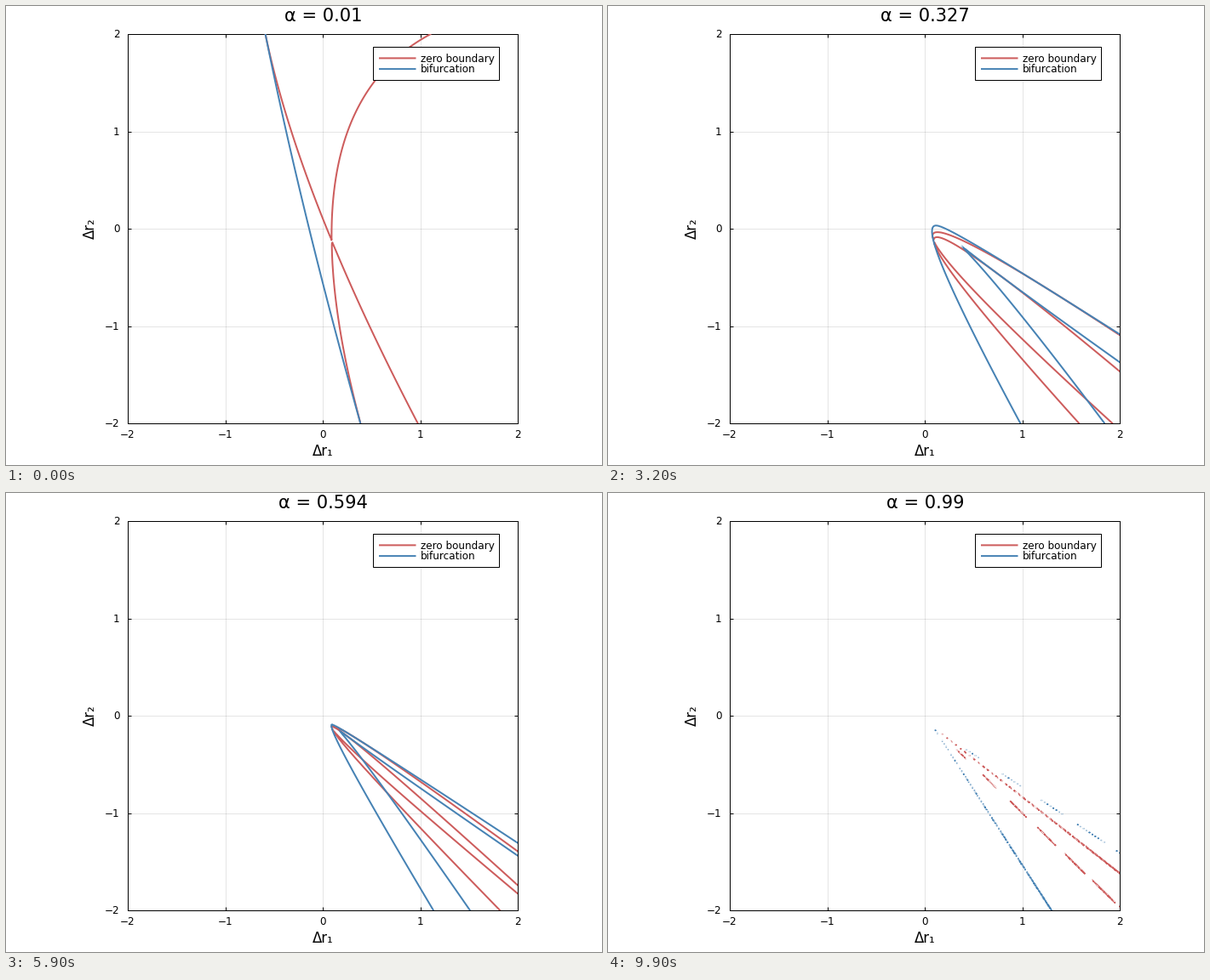
Animation, 700 px wide and 540 px high, one loop 10000 ms. Source, as a matplotlib script:

```python
import numpy as np
import matplotlib.pyplot as plt
from matplotlib.animation import FuncAnimation
from matplotlib.lines import Line2D
from matplotlib.patches import Rectangle

W, H = 700, 540
PT = 0.72                      # points per pixel at 100 dpi
RED, BLUE = "#cd5c5c", "#4682b4"
LEFT, TOP, SIDE = 143, 33, 458
LINE = 2 * PT
FRAMES = 100

# Equilibria: r = ORIGIN + EDGES @ (M v + s v**2), with s = alpha / (1 - alpha)**2
ORIGIN = (0.0915, -0.1211)
E1, E2 = 1.554, 0.6749         # slopes of the limiting cone
M = np.array([[-0.7528, -0.1031],
              [0.5686, -0.0220]])
AXES = np.array([[0.35309, 0.93559],
                 [-0.57515, 0.81805]])   # directions where one abundance is zero

grid = np.linspace(-2, 2, 401)
X, Y = np.meshgrid(grid, grid)
dx, dy = X - ORIGIN[0], Y - ORIGIN[1]
p = -(dy + E2 * dx) / (E1 - E2)
q = (E1 * dx + dy) / (E1 - E2)


def cross(u, v):
    return u[0] * v[1] - u[1] * v[0]


def zero_boundary(s):
    out = 1
    for d in AXES:
        a, b = M @ d, d ** 2
        out = out * (s * cross((p, q), b) ** 2 + cross(a, b) * cross((p, q), a))
    return out


def bifurcation(s):
    (m11, m12), (m21, m22) = M
    u = p + (m11 ** 2 / 4 + m12 * m22 / 2) / s
    v = q + (m22 ** 2 / 4 + m21 * m11 / 2) / s
    k, n = m12 ** 2, m21 ** 2
    return (256 * u ** 2 * v ** 2 - 256 * (k * v ** 3 + n * u ** 3) / s
            + 288 * k * n * u * v / s ** 2 - 27 * (k * n) ** 2 / s ** 4)


plt.rcParams["font.family"] = "DejaVu Sans"
plt.rcParams["path.simplify"] = False    # keeps the tiny contour loops solid
fig = plt.figure(figsize=(W / 100, H / 100), dpi=100, facecolor="white")
ax = fig.add_axes([LEFT / W, 1 - (TOP + SIDE) / H, SIDE / W, SIDE / H])
ax.set(xlim=(-2, 2), ylim=(-2, 2), xticks=range(-2, 3), yticks=range(-2, 3))
ax.set_axisbelow(True)
ax.grid(color="black", alpha=0.1, linewidth=PT)
ax.tick_params(direction="in", length=4 * PT, width=PT, top=True, right=True,
               labelbottom=False, labelleft=False)
for spine in ax.spines.values():
    spine.set_linewidth(PT)


def label(x, y, text, size, ha="center", **kw):
    return fig.text(x / W, 1 - y / H, text, fontsize=size * PT, ha=ha,
                    va="baseline", zorder=6, **kw)


for k in range(-2, 3):
    text = str(k).replace("-", "\u2212")
    offset = (k + 2) * SIDE / 4
    label(LEFT + offset, 508, text, 12)
    label(133.5, TOP + SIDE - offset + 4.4, text, 12, ha="right")
label(372, 529, "Δr₁", 16.5)
label(103.5, 262, "Δr₂", 16.5, rotation=90, rotation_mode="anchor")
title = label(372.5, 18, "", 21)


def add_pixel_artist(artist):
    artist.set_transform(fig.transFigure)
    artist.set_clip_on(False)
    ax.add_artist(artist)


add_pixel_artist(Rectangle((431 / W, 1 - 87.5 / H), 148 / W, 39 / H, fc="white",
                           ec="black", lw=PT, zorder=5))
for y, color, text in ((61.4, RED, "zero boundary"), (74.1, BLUE, "bifurcation")):
    add_pixel_artist(Line2D([438 / W, 481.5 / W], [1 - y / H] * 2, color=color,
                            lw=LINE, solid_capstyle="butt", snap=False, zorder=6))
    label(487, y + 4.4, text, 12, ha="left")

curves = []


def update(i):
    while curves:
        curves.pop().remove()
    alpha = 0.01 + 0.98 * i / (FRAMES - 1)
    s = alpha / (1 - alpha) ** 2
    for f, color in ((zero_boundary, RED), (bifurcation, BLUE)):
        lines = ax.contour(X, Y, f(s), [0], colors=color, linewidths=LINE, zorder=3)
        lines.set(capstyle="round", joinstyle="round", snap=False)
        curves.append(lines)
    title.set_text(f"α = {round(alpha, 3)}")
    return []


anim = FuncAnimation(fig, update, frames=FRAMES, init_func=lambda: [],
                     interval=100, repeat=True, repeat_delay=0, blit=False)
plt.show()
```
